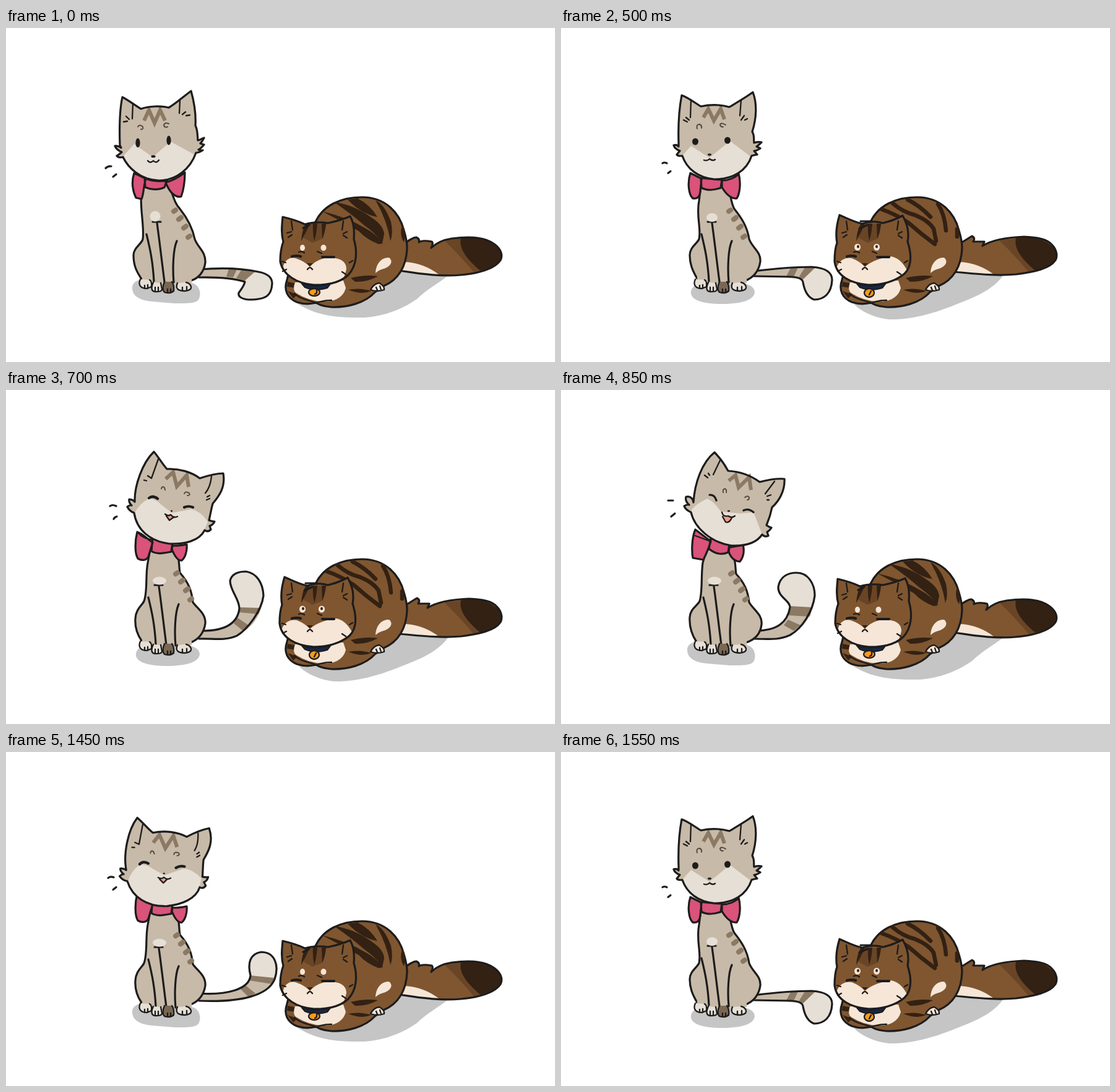
These frames come from a looping animation (887 by 541 pixels, 1.7 s). An HTML page:

```html
<!DOCTYPE html>
<html lang="en">
<head>
<meta charset="utf-8">
<title>Two cats</title>
<style>
html, body { margin: 0; width: 100%; height: 100%; overflow: hidden; background: #fff; }
svg { display: block; width: 887px; height: 541px; }
path, ellipse { fill: none; }
.o, .l { stroke: #1d1c1c; stroke-width: 3.2; stroke-linecap: round; stroke-linejoin: round; }
.l { --fill: none; } /* reused shapes become bare outlines */
.thin { stroke-width: 2.3; }
.bold { stroke-width: 4.2; }
.shadow { fill: #c5c5c5; }
.fur { fill: var(--fill, #c7baa8); }
.pale { fill: #e6dfd6; }
.paw { fill: #7a6753; }
.band { fill: #8c7963; }
.bow { fill: #d9537a; }
.ink { fill: #1d1c1c; }
.tongue { fill: #f09a8a; }
.brow { stroke: #574b3f; stroke-width: 2; stroke-linecap: round; }
.zig { stroke: #8c7963; stroke-width: 6; }
.flank { stroke: #8c7963; stroke-width: 8; stroke-linecap: round; }
.brown { fill: var(--fill, #7f5630); }
.mid { fill: #694526; }
.dark { fill: #332113; }
.stripe { stroke: #332113; stroke-width: 6.5; stroke-linecap: round; }
.cream { fill: #f5e6d7; }
.navy { fill: #14284d; }
.gold { fill: #f79a1e; }
</style>
</head>
<body>
<svg viewBox="0 0 887 541">

<!-- shadows; data-on lists the poses in which a part is visible -->
<g data-on="0 2 4">
  <path class="shadow" d="M204 421C204 408 220 405 240 407L300 413C314 416 316 432 311 440C306 447 290 446 272 446L236 443C214 441 204 433 204 421Z"/>
  <path class="shadow" d="M470 446C500 465 530 470 580 469C620 466 648 450 664 439C680 423 700 413 714 401L640 395Z"/>
</g>
<g data-on="1 3">
  <path class="shadow" d="M210 427C212 412 240 408 262 409C300 411 313 418 313 428C312 441 290 447 260 447C228 447 208 440 210 427Z"/>
  <path class="shadow" d="M472 446C490 465 520 473 540 472C590 470 632 450 660 439C685 429 705 415 714 401L640 395Z"/>
</g>

<!-- slim cat: tail -->
<g data-on="0">
  <path class="fur" d="M312 391C350 387 385 390 402 395L386 411Q350 402 312 404Z"/>
  <path class="pale" d="M402 395Q425 398 429 410C430 433 420 440 392 440Q374 438 376 428Q386 416 386 408Z"/>
  <path class="band" d="M360 390L373 391 367 404 356 403ZM381 391L402 395 386 409 372 405Z"/>
  <path class="l" d="M312 391C350 388 385 390 408 395Q430 399 430 414C429 434 420 440 392 440Q374 438 376 429Q385 417 386 411Q360 403 312 404"/>
</g>
<g data-on="1">
  <path class="fur" d="M312 394C350 389 385 387 411 388L391 408Q360 402 312 402Z"/>
  <path class="pale" d="M411 388Q438 390 438 408C437 430 425 440 409 440Q392 436 391 408Z"/>
  <path class="band" d="M371 389L383 388 376 403 364 402ZM394 388L411 388 391 407 384 404Z"/>
  <path class="l" d="M312 394C350 389 380 387 405 387Q438 389 438 408C437 430 425 440 409 440Q395 435 391 412Q390 404 372 403L312 402"/>
</g>
<g data-on="2">
  <path class="fur" d="M312 391C355 394 390 385 395 364L434 368C424 394 380 406 312 403Z"/>
  <path class="pale" d="M395 364C390 344 394 327 412 324C434 324 442 345 434 368Z"/>
  <path class="band" d="M395 362L435 366 431 376 393 370ZM387 378L403 391 392 397 379 384Z"/>
  <path class="l" d="M312 391C355 394 393 385 395 362C390 342 394 327 412 324C434 324 442 345 434 368C424 394 380 406 312 403"/>
</g>
<g data-on="3">
  <path class="fur" d="M312 390C350 390 375 382 377 353L412 354C402 384 380 406 312 403Z"/>
  <path class="pale" d="M377 353C376 335 362 325 362 309C365 296 378 294 388 294C407 297 425 325 411 355Z"/>
  <path class="band" d="M377 352L412 353 408 363 376 360ZM374 369L392 381 383 390 368 378Z"/>
  <path class="l" d="M312 390C350 391 374 380 377 354C377 338 362 325 362 309C365 296 378 294 388 294C405 297 415 312 416 333C413 358 390 388 373 398C352 407 334 402 312 403"/>
</g>
<g data-on="4">
  <path class="fur" d="M313 390C350 390 366 376 370 350L407 352C396 390 366 406 313 403Z"/>
  <path class="pale" d="M370 351C370 341 350 335 351 319C354 302 367 296 381 296C400 296 416 325 406 353Z"/>
  <path class="band" d="M370 350L406 352 402 367 367 365ZM367 372L387 381 376 390 360 381Z"/>
  <path class="l" d="M313 390C350 390 366 376 370 352C370 341 350 335 351 319C354 302 367 296 381 296C399 296 410 314 410 333C407 358 390 386 370 397C350 406 334 403 313 403"/>
</g>

<!-- slim cat: body -->
<path data-on="0" class="o fur" d="M220 408C211 395 206 385 206 368C206 356 219 350 221 342C224 320 215 290 219 257L262 252C270 270 272 284 281 293C293 308 301 322 305 342C310 356 323 362 322 380C320 396 310 406 299 409"/>
<path data-on="1" class="o fur" d="M220 406C212 392 208 382 208 368C208 355 220 349 223 342C227 325 218 305 223 280L226 255 269 252C274 270 275 285 280 293C292 308 301 322 304 342C309 356 323 362 322 378C320 394 310 405 298 409"/>
<path data-on="2 3" class="o fur" d="M219 406C212 396 208 384 209 370C210 354 220 349 223 342C229 326 225 300 229 280L233 258 275 258C281 275 279 285 281 296C295 312 300 325 302 344C309 354 323 362 322 378C320 394 310 405 298 409"/>
<path data-on="4" class="o fur" d="M219 408C211 396 207 384 208 368C209 354 220 350 224 342C229 326 226 300 229 280L235 258 276 260C284 280 281 290 283 298C296 312 302 325 304 344C311 356 326 364 324 380C322 396 312 405 299 409"/>
<path class="fur" d="M220 400H300V413H220Z"/>
<g data-on="0 1">
  <path id="flank" class="flank" d="M271 297L274 295M279 310L283 307M287 324L291 321M294 339L297 337"/>
  <path id="legs" class="l" d="M227 334C232 355 237 375 239 410M237 314H250M244 316C248 345 252 380 256 411M276 345C270 358 269 390 271 412"/>
</g>
<g data-on="2 3 4"><use href="#flank" x="3" y="1"/><use href="#legs" x="3" y="2"/></g>
<ellipse data-on="0" class="pale" cx="241" cy="305" rx="8.5" ry="8.5"/>
<ellipse data-on="1" class="pale" cx="244" cy="307" rx="9" ry="7"/>
<ellipse data-on="2 3 4" class="pale" cx="248" cy="309" rx="11" ry="6.5"/>
<path class="o thin pale" d="M217 407C213 416 217 422 228 422L235 419Q236 410 232 408M238 412Q232 425 240 427Q252 428 252 423L250 413M277 413C273 422 278 426 289 426Q300 425 299 419Q297 413 291 412"/>
<path class="o thin paw" d="M256 411Q251 423 256 428Q265 431 271 426Q272 416 268 411"/>
<path class="l thin" d="M224 417V422M229 416V421M241 420V426M246 420V426M261 423V428M266 423V427M285 420V425M292 419V424"/>

<!-- slim cat: bow -->
<path data-on="0" class="o bow" d="M224 243C235 248 248 249 260 247L256 258C246 263 234 262 225 258ZM207 235C202 250 205 265 210 275L219 277C223 268 222 255 226 244ZM258 250C270 247 280 241 289 234C289 250 287 262 283 273C273 275 264 266 258 250Z"/>
<path data-on="1" class="o bow" d="M226 243L260 246 258 259C247 263 237 264 227 259ZM209 235C204 250 206 270 213 276C220 277 224 274 225 265L227 244ZM260 247C270 247 281 243 287 236C291 250 289 268 284 276C274 277 266 268 260 258Z"/>
<g data-on="2 3">
  <path class="o bow" d="M237 239L269 247 267 262C256 264 244 267 235 261ZM212 230C208 245 208 265 213 273C220 277 227 276 230 270L237 247C228 241 220 232 212 230ZM269 252C278 253 287 251 292 250C293 262 289 272 284 276C277 277 272 268 268 258Z"/>
  <path class="l thin" d="M214 232Q222 241 235 242"/>
</g>
<g data-on="4">
  <path class="o bow" d="M242 240L272 250 270 263C258 268 247 264 239 257ZM217 226C211 240 211 262 213 272L230 275C235 265 239 255 242 245Q230 236 217 226ZM272 255L294 251C297 262 294 272 289 278C280 277 274 271 271 262Z"/>
  <path class="l thin" d="M217 236L241 245"/>
</g>

<!-- slim cat: head -->
<g data-on="0">
  <path class="fur" id="faceA" d="M184 190C183 160 184 130 188 112C198 117 208 125 218 131C232 126 250 126 263 129C275 122 288 110 299 102C304 120 307 142 306 158C310 166 309 172 310 182C313 182 316 179 320 178Q317 184 314 187L320 189Q314 196 311 197Q315 199 318 198Q312 202 307 202C298 228 275 247 247 247C217 246 197 226 189 209Q182 211 179 207Q184 204 187 201Q178 197 176 191Q181 190 186 194Z"/>
  <path class="pale" d="M190 207L207 188 237 209 266 184 306 206C297 228 275 246 247 246C217 245 198 228 190 207Z"/>
  <path class="zig" d="M223 150L231 133 240 154 249 133 257 150"/>
  <use href="#faceA" class="l"/>
  <ellipse class="ink" cx="213" cy="186" rx="3.6" ry="7.5"/><ellipse class="ink" cx="263" cy="182" rx="3.6" ry="7.5"/>
  <ellipse class="ink" cx="238" cy="208" rx="3.6" ry="2"/>
  <path class="l thin" d="M229 215Q233 220 238 215Q243 220 247 214M205 122L204 147M194 143L199 148M190 152L196 151M281 118L280 138M285 140L290 136M291 142L297 141"/>
  <path class="brow" d="M213 160Q216 155 221 160Q222 165 218 164M263 155Q256 152 255 158Q257 162 261 160"/>
  <path class="l" d="M161 227Q165 223 170 224M173 241L178 237"/>
</g>
<g data-on="1">
  <path class="fur" id="faceB" d="M190 186C189 155 191 130 195 109C206 113 216 121 226 127C240 124 258 124 272 128C287 119 299 112 310 104C317 122 316 146 309 168C313 174 311 180 312 186Q318 184 324 185Q319 190 316 192L322 195Q316 199 312 199L317 205Q311 206 308 207C300 232 277 245 248 245C222 243 203 228 196 207Q189 208 187 205L192 199Q184 196 182 190Q187 188 190 192Z"/>
  <path class="pale" d="M196 207L210 191 240 210 273 183 306 208C298 232 277 244 248 244C222 242 204 230 196 207Z"/>
  <path class="zig" d="M230 145L238 131 247 150 258 131 264 148"/>
  <use href="#faceB" class="l"/>
  <ellipse class="ink" cx="217" cy="184" rx="5" ry="5.5"/><ellipse class="ink" cx="269" cy="182" rx="5" ry="5.5"/>
  <ellipse class="ink" cx="240" cy="205" rx="3" ry="1.8"/>
  <path class="l thin" d="M231 214Q236 216 240 212Q245 216 249 213M210 117L209 145M198 149L204 152M202 145L207 149M291 117L289 142M291 149L296 142M297 149L301 147"/>
  <path class="brow" d="M220 163Q218 156 224 156Q228 158 227 162M266 157Q258 152 257 157Q258 161 262 160"/>
  <path class="l" d="M164 219Q167 217 171 219M173 235L177 232"/>
</g>
<g data-on="3">
  <g id="headC">
    <path class="fur" id="faceC" d="M208 178C208 155 220 118 239 100C246 108 252 119 260 128C280 127 300 133 313 143C328 138 340 135 351 135C355 158 344 172 334 184C331 195 330 203 328 211Q333 213 337 213Q334 219 329 220L331 226Q326 231 321 227C312 245 288 250 264 249C232 245 211 226 207 199Q199 196 196 189Q200 186 203 187Q198 182 199 177Q204 177 208 181Z"/>
    <path class="pale" d="M208 199Q216 184 229 177Q240 174 251 186L268 199 300 193Q314 196 326 213L320 228C312 244 288 249 264 248C233 244 212 226 208 199Z"/>
    <path class="zig" d="M258 144L270 133 276 156 292 138 295 157"/>
    <use href="#faceC" class="l"/>
    <path class="l bold" d="M231 175Q237 170 245 176M288 190Q295 187 302 190"/>
    <path class="tongue" d="M259 203L264 211 272 206Z"/>
    <path class="l thin" d="M257 201Q262 205 266 202Q271 208 277 205M259 204L264 211 271 206M267 196L268 196M246 112L235 143 229 139M223 146L227 147M332 140Q330 158 322 167M325 173L329 171M324 178L329 176"/>
    <path class="brow" d="M251 160Q252 155 256 158L257 162M288 168Q290 163 296 167Q298 171 293 171"/>
  </g>
  <path class="l" d="M168 188Q172 185 178 188M174 209Q175 206 179 205"/>
</g>
<g data-on="2">
  <use href="#headC" transform="translate(-4 1) rotate(-9 262 248)"/>
  <path class="l" d="M165 204Q169 201 174 203M173 223L178 219"/>
</g>
<g data-on="4">
  <path class="fur" id="faceD" d="M214 182C216 150 228 117 248 101C257 110 264 120 270 131C288 132 306 138 321 149C336 145 349 143 361 144C362 164 352 180 341 190C339 200 335 212 332 219Q336 222 340 223Q337 228 333 230L335 236Q329 239 325 234C315 249 295 253 275 252C243 247 216 224 210 198Q201 194 199 188Q203 185 207 186Q200 180 202 173Q209 171 213 178Z"/>
  <path class="pale" d="M210 197Q212 188 236 176Q248 181 258 197L290 200 311 198 325 234C314 248 295 252 275 251C243 246 218 226 210 197Z"/>
  <path class="zig" d="M271 147L282 138 287 158 304 141 307 162"/>
  <use href="#faceD" class="l"/>
  <path class="l" d="M240 170Q248 169 251 179M295 195Q303 191 311 198"/>
  <path class="tongue" d="M261 204L266 214Q272 216 276 207L270 204Z"/>
  <path class="l thin" d="M260 198Q262 206 270 204Q276 208 281 204M261 205L266 214Q272 216 276 207M270 196L272 196M257 114L246 137M238 135L240 138M232 138L237 142M345 148L330 168M333 172L339 170M333 178L336 178"/>
  <path class="brow" d="M262 166Q261 160 265 160Q268 161 267 166M297 174Q302 170 304 174Q304 178 301 178"/>
  <path class="l" d="M173 179H181M178 205L184 200"/>
</g>

<!-- round cat: tail -->
<path data-on="0 2 4" class="brown" d="M640 352C652 343 658 339 663 339Q669 342 667 347Q672 343 688 346Q691 349 687 356Q700 344 720 341C750 337 775 339 789 350C800 358 803 368 799 376C790 390 765 397 735 400C700 403 670 398 635 393" id="tailA"/>
<path data-on="1 3" class="brown" d="M640 352L664 337Q670 340 666 346L684 346 681 353C698 342 722 339 748 338C770 339 786 342 793 351C800 358 803 368 799 376C790 390 765 395 735 399C700 402 670 398 635 395" id="tailB"/>
<path class="mid" d="M708 344L735 341Q735 358 766 393L757 397Q735 370 708 344Z"/>
<path class="dark" d="M735 340C755 337 780 342 789 350C800 358 803 368 799 376C793 385 782 390 766 393C745 374 731 358 735 340Z"/>
<path class="cream" d="M638 396L646 379Q675 381 699 399Q670 399 638 396Z"/>
<g data-on="0 2 4"><use href="#tailA" class="l"/></g>
<g data-on="1 3"><use href="#tailB" class="l"/></g>

<!-- round cat: body -->
<path class="o brown" d="M500 314C512 288 540 274 575 274C614 274 636 300 643 328C646 338 648 345 648 356C647 386 634 408 610 418L596 428C580 446 550 453 525 452Q510 451 501 445Q485 449 470 444C455 438 448 425 454 408L470 340Z"/>
<g data-on="0 2 4">
  <path class="dark" d="M511 297Q550 306 580 324Q599 334 609 349L602 350Q583 343 570 329Q540 312 511 297ZM530 282Q562 286 592 308Q610 320 611 334L608 348Q597 332 578 319Q558 301 530 282ZM552 278L568 276Q588 286 600 306Q575 302 552 278ZM597 279Q612 286 622 314Q626 333 621 345Q616 312 597 279ZM640 319Q648 330 643 347Q635 335 640 319Z"/>
</g>
<g data-on="1 3">
  <path class="stripe" d="M519 294Q542 302 562 316Q582 334 604 350M536 284Q552 298 572 303Q594 312 602 325L606 345M560 278Q580 288 597 306M609 285Q620 302 622 328M640 326V338"/>
</g>
<path class="dark" d="M557 405Q580 399 601 402Q583 412 564 411ZM553 424Q572 420 590 426Q575 433 553 424ZM455 411L469 414 468 421 454 419ZM455 426L471 432 464 438Z"/>
<path class="cream" d="M597 397C598 380 608 371 619 372C627 379 620 387 610 390Q602 392 597 397ZM467 412Q462 426 470 430Q492 444 520 443Q544 440 549 421L545 409Z"/>
<path class="o thin cream" d="M589 424Q594 414 603 413Q612 418 611 424Q600 428 589 424Z"/>
<path class="l thin" d="M598 420L600 425M604 418L606 424M466 430C475 440 495 442 503 446M500 446Q512 441 526 441"/>
<path class="o thin navy" d="M478 414Q500 422 525 413L519 421Q500 427 483 420Z"/>
<g data-on="0 2 4">
  <ellipse class="o thin gold" cx="498" cy="428" rx="9" ry="6"/>
  <path class="l thin" d="M499 431Q503 430 502 425"/>
</g>
<g data-on="1 3">
  <ellipse class="o thin gold" cx="498" cy="429" rx="8" ry="7"/>
  <path class="l thin" d="M498 432L501 426"/>
</g>

<!-- round cat: head -->
<g data-on="0 2 4">
  <path class="brown" id="mugA" d="M447 306C460 309 473 313 483 318Q500 313 520 316Q540 312 556 305C562 315 563 330 562 342C568 362 567 385 553 400C538 414 515 417 497 416C470 414 447 400 443 378Q443 360 448 346C444 332 446 318 447 306Z"/>
  <path class="cream" d="M447 390C449 375 460 370 468 373Q483 378 491 387Q500 376 515 373C535 370 550 376 550 390Q548 400 545 405C530 414 510 416 497 415C475 413 455 405 447 390Z"/>
</g>
<g data-on="1 3">
  <path class="brown" id="mugB" d="M450 303C462 308 475 315 487 317Q505 311 520 316Q537 312 552 304C559 316 563 330 560 346C566 365 568 385 555 398C538 412 515 416 497 416C468 414 445 402 442 378Q442 358 446 348C443 332 446 316 450 303Z"/>
  <path class="cream" d="M445 388Q453 370 470 373Q483 378 491 387Q505 374 533 370Q548 372 559 392C540 412 515 415 497 415C475 413 455 405 445 388Z"/>
</g>
<path class="mid" d="M484 318L518 317 510 342 495 348 481 340Z"/>
<path class="dark" d="M477 345Q478 328 484 318L491 317Q485 331 477 345ZM496 317H503Q502 332 498 345Q495 330 496 317ZM510 317H517Q516 330 511 342Z"/>
<g data-on="0 2 4">
  <use href="#mugA" class="l"/>
  <ellipse class="cream" cx="479" cy="356" rx="4" ry="5"/><ellipse class="cream" cx="513" cy="356" rx="4.5" ry="5"/>
  <path class="l" d="M480 324L490 319"/>
</g>
<g data-on="1 3">
  <use href="#mugB" class="l"/>
  <ellipse class="cream" cx="479" cy="355" rx="5" ry="5.5"/><ellipse class="cream" cx="510" cy="355" rx="5" ry="5.5"/>
  <ellipse class="dark" cx="480" cy="354" rx="2" ry="2.5"/><ellipse class="dark" cx="510" cy="354" rx="2" ry="2.5"/>
  <path class="l" d="M482 325L495 319M484 313H502"/>
</g>
<path class="l bold" d="M462 370Q470 368 476 370M511 371H530"/>
<path class="l thin" d="M487 391Q491 385 495 391M473 363Q478 361 482 364M503 362L510 365M461 313L463 327M454 332L461 330M456 339L462 335M545 313L543 327M545 333L551 330M545 336L551 340M446 378L452 380M447 394L453 391M560 377L555 380M543 395L549 399"/>
<path class="dark" d="M486 381H496L491 386Z"/>
</svg>
<script>
const LOOP = 1700;
// [start in ms, pose]
const timeline = [[0, 0], [500, 1], [600, 2], [700, 3], [850, 4], [1350, 3], [1450, 2], [1550, 1]];
const parts = [...document.querySelectorAll('[data-on]')]
  .map(el => ({ el, poses: el.dataset.on.split(' ').map(Number) }));
let shown = -1;

function show(pose) {
  if (pose === shown) return;
  shown = pose;
  for (const { el, poses } of parts) el.style.visibility = poses.includes(pose) ? 'visible' : 'hidden';
}

function tick() {
  const t = performance.now() % LOOP;
  show(timeline.findLast(([start]) => start <= t)[1]);
  requestAnimationFrame(tick);
}
tick();
</script>
</body>
</html>
```
